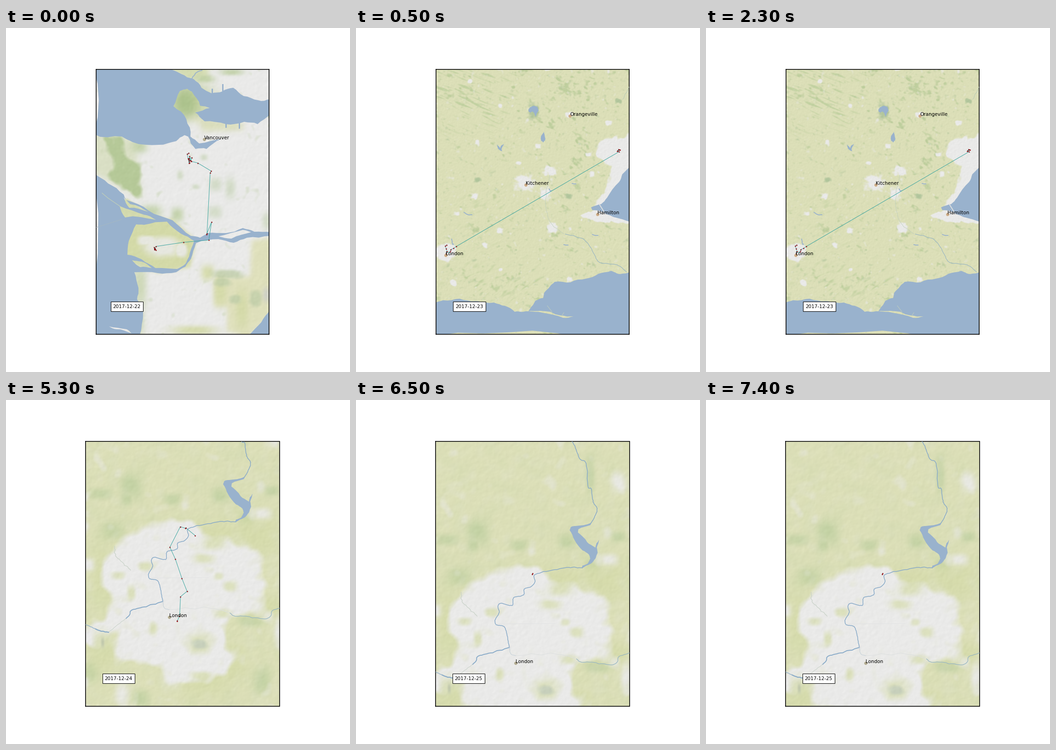
These frames come from a looping animation (748 by 748 pixels, 8 s). A matplotlib script:

```python
import numpy as np
import matplotlib.pyplot as plt
from matplotlib.animation import FuncAnimation
from matplotlib.patches import Polygon, Rectangle
from matplotlib.path import Path

SIZE, DPI = 748, 68
PX = 72 / DPI                     # points per pixel
TOP, BOTTOM = 89.76, 665.72
WATER, TOWN, FIELD = (153, 178, 205), (234, 234, 233), (220, 223, 184)
WOOD, MEADOW, STREAM = (180, 200, 150), (212, 218, 168), (136, 170, 200)
PALE, TEAL, TAN = (200, 210, 200), (60, 165, 160), (206, 172, 135)
GREY = (180, 172, 146)

plt.rcParams["font.family"] = "DejaVu Sans"
fig = plt.figure(figsize=(SIZE / DPI, SIZE / DPI), dpi=DPI, facecolor="white")


def rgb(c):
    return tuple(v / 255 for v in c)


def rough(pts, amp=0.1, levels=2, closed=True):
    """Break straight edges by random midpoint displacement."""
    rng = np.random.default_rng(1)
    p = np.array(pts, float)
    for _ in range(levels):
        d = np.roll(p, -1, 0) - p
        mid = p + d / 2 + d[:, ::-1] * (1, -1) * rng.uniform(-amp, amp, (len(p), 1))
        p = np.stack([p, mid], 1).reshape(-1, 2)
        if not closed:
            p = p[:-1]
    return p


def smooth(pts, n=4):
    """Catmull-Rom curve through the points."""
    p = np.array(pts, float)
    p = np.vstack([2 * p[0] - p[1], p, 2 * p[-1] - p[-2]])
    t = np.linspace(0, 1, n, endpoint=False)[:, None]
    out = []
    for a, b, c, d in zip(p, p[1:], p[2:], p[3:]):
        out.append(0.5 * (2 * b + (c - a) * t + (2 * a - 5 * b + 4 * c - d) * t**2
                          + (3 * b - a - 3 * c + d) * t**3))
    return np.vstack(out + [p[-2:-1]])


def cluster(x, y, n, sx, sy, seed):
    rng = np.random.default_rng(seed)
    return [tuple(p) for p in rng.normal((x, y), (sx, sy), (n, 2))]


class Terrain:
    def __init__(self, x0, y0, x1, y1, base, seed):
        self.extent = (x0, x1, y1, y0)
        self.x, self.y = np.meshgrid(np.arange(x0, x1) + 0.5, np.arange(y0, y1) + 0.5)
        self.img = np.ones(self.x.shape + (3,)) * base
        self.rng = np.random.default_rng(seed)

    def blur(self, a, sx, sy=None, angle=0):
        sy = sy or sx
        pad = 24
        a = np.pad(a, pad, mode="edge")
        fy = np.fft.fftfreq(a.shape[0])[:, None]
        fx = np.fft.rfftfreq(a.shape[1])[None]
        c, s = np.cos(np.radians(angle)), np.sin(np.radians(angle))
        u, v = fx * c + fy * s, fy * c - fx * s
        k = np.exp(-2 * np.pi**2 * ((sx * u)**2 + (sy * v)**2))
        return np.fft.irfft2(np.fft.rfft2(a) * k, a.shape)[pad:-pad, pad:-pad]

    def noise(self, sx, sy=None, angle=0):
        n = self.blur(self.rng.normal(size=self.x.shape), sx, sy, angle)
        return n / n.std()

    def tint(self, mask, color, alpha=1):
        m = np.clip(mask, 0, 1)[..., None] * alpha
        self.img += m * (np.array(color) - self.img)

    def ragged(self, m, rag, grain, width):
        if rag:
            m = (m - 0.5 + rag * self.noise(grain)) / width + 0.5
        return m

    def area(self, pts, color, soft=4, alpha=1, rag=0, grain=4, width=0.6):
        xy = np.c_[self.x.ravel(), self.y.ravel()]
        m = Path(pts).contains_points(xy).reshape(self.x.shape).astype(float)
        self.tint(self.ragged(self.blur(m, soft), rag, grain, width), color, alpha)

    def spots(self, items, color, alpha=1, rag=0, grain=4, width=0.6):
        m = np.zeros(self.x.shape)
        for cx, cy, rx, ry in items:
            d = np.abs((self.x - cx) / rx)**2.6 + np.abs((self.y - cy) / ry)**2.6
            m = np.maximum(m, np.exp(-0.7 * d))
        self.tint(self.ragged(m, rag, grain, width), color, alpha)

    def density(self, items):
        return sum(a * np.exp(-((self.x - cx) / rx)**2 - ((self.y - cy) / ry)**2)
                   for cx, cy, rx, ry, a in items)

    def relief(self, grain, amp):
        n = self.noise(grain)
        d = n - np.roll(n, (1, 1), (0, 1))
        self.img += (amp * d / d.std())[..., None]


class Scene:
    def __init__(self, x0, x1, date, date_x, terrain, shift=(0, 0)):
        dx, dy = shift
        self.ax = fig.add_axes([x0 / SIZE, 1 - BOTTOM / SIZE,
                                (x1 - x0) / SIZE, (BOTTOM - TOP) / SIZE])
        self.ax.set(xticks=[], yticks=[])
        for s in self.ax.spines.values():
            s.set_linewidth(1.6 * PX)
        self.limits = (x0 - dx, x1 - dx), (BOTTOM - dy, TOP - dy)
        bx, by = date_x - dx, 595.3 - dy
        self.ax.add_patch(Rectangle((bx, by), 70.5, 20.5, fc="white", ec="black",
                                    lw=1.05 * PX, zorder=8))
        self.ax.text(bx + 5, by + 13.3, date, fontsize=11, zorder=9)
        self.terrain = terrain
        self.image(0)

    def image(self, z):
        im = self.ax.imshow(np.clip(self.terrain.img / 255, 0, 1), zorder=z,
                            extent=self.terrain.extent, aspect="auto",
                            interpolation="bilinear")
        self.ax.set(xlim=self.limits[0], ylim=self.limits[1])
        return im

    def water(self, pts, amp=0.1, levels=2):
        self.ax.add_patch(Polygon(rough(pts, amp, levels), fc=rgb(WATER), ec="none", zorder=1))

    def island(self, pts, amp=0.07):
        self.image(2).set_clip_path(Path(rough(pts, amp)), self.ax.transData)

    def line(self, pts, color=STREAM, width=1.2, z=3):
        p = np.array(pts)
        self.ax.plot(p[:, 0], p[:, 1], color=rgb(color), lw=width * PX, zorder=z)

    def stream(self, pts, color=STREAM, width=1.2, amp=0.12):
        self.line(rough(smooth(pts), amp, 1, closed=False), color, width)

    def city(self, x, y, name, color):
        self.ax.plot(x, y, "o", ms=7 * PX, mfc=rgb(color), mec="none", zorder=4)
        self.ax.text(x, y, name, fontsize=11, zorder=7)

    def track(self, pts):
        self.line(pts, TEAL, 1, z=5)
        p = np.array(pts)
        self.ax.plot(p[:, 0], p[:, 1], "o", ms=2.1 * PX, mfc=rgb((230, 0, 15)),
                     mec=rgb((70, 15, 15)), mew=0.45 * PX, zorder=6)


def coast_scene():
    t = Terrain(195, 89, 573, 667, TOWN, 3)
    t.area([(195, 228), (280, 240), (295, 372), (195, 318)], (214, 221, 188), 7, 0.8)
    t.area([(208, 234), (255, 235), (260, 284), (292, 292), (292, 374), (212, 318),
            (240, 305)], WOOD, 5, 0.95, 0.12)
    t.spots([(398, 160, 46, 36)], (196, 209, 159))
    t.spots([(390, 163, 20, 28)], (170, 193, 139), 0.9)
    t.area([(340, 80), (440, 80), (440, 110), (395, 115)], (212, 220, 178), 6)
    t.spots([(290, 257, 15, 13), (315, 400, 20, 14), (372, 406, 12, 14),
             (432, 110, 18, 7), (490, 96, 22, 6)], (190, 207, 162), 0.8)
    t.area([(395, 192), (515, 205), (515, 222), (425, 224)], (217, 221, 184), 6, 0.9)
    t.spots([(410, 218, 14, 14)], TOWN, 0.7)
    t.spots([(455, 340, 12, 13), (487, 348, 10, 20), (454, 400, 13, 12), (378, 320, 6, 9),
             (412, 345, 7, 5), (430, 281, 7, 6), (567, 420, 10, 16)], (204, 215, 190), 0.75)
    t.area([(255, 415), (362, 415), (412, 462), (400, 520), (330, 532), (255, 505)], MEADOW)
    t.area([(240, 380), (262, 370), (335, 420), (250, 418)], (211, 218, 174), 2)
    t.spots([(338, 475, 36, 20), (306, 462, 20, 10), (380, 482, 12, 14)], TOWN, 0.85, 0.06, 7)
    t.spots([(290, 560, 14, 46), (285, 640, 14, 30)], (204, 215, 180), 0.9)
    t.area([(533, 462), (580, 455), (573, 625), (528, 670), (480, 660), (480, 605),
            (452, 605), (452, 540), (530, 540)], (223, 224, 188), 5)
    t.spots([(438, 532, 13, 15), (408, 657, 42, 9), (465, 570, 12, 30),
             (512, 610, 12, 36)], MEADOW, 0.9)
    t.spots([(482, 535, 32, 9), (470, 552, 16, 9), (542, 588, 13, 17),
             (498, 590, 13, 9)], (191, 205, 168), 0.75, 0.05)
    t.spots([(566, 580, 8, 14)], (207, 209, 200), 0.9)
    t.relief(2.2, 1.1)
    t.relief(6, 0.8)
    s = Scene(195.5, 572.3, "2017-12-22", 227.5, t)

    s.water([(190, 85), (338, 88), (381, 100), (408, 111), (425, 130), (447, 142), (470, 138),
             (494, 130), (517, 148), (548, 157), (575, 155), (575, 188), (547, 209), (518, 204),
             (478, 209), (432, 203), (424, 196), (411, 184), (443, 174), (422, 169),
             (404, 138), (394, 132), (378, 137), (364, 170), (392, 198), (401, 236),
             (420, 251), (467, 242), (436, 263), (412, 263), (396, 236), (388, 233),
             (370, 246), (332, 254), (275, 248), (252, 236), (190, 230)], 0.09)
    for x, a, b in [(448, 133, 146), (471, 123, 142), (507, 200, 217), (478, 204, 215)]:
        s.line([(x, a), (x, b)], WATER, 3)
    s.water([(190, 314), (222, 338), (256, 362), (261, 374), (310, 397), (362, 418),
             (402, 452), (422, 456), (438, 446), (478, 446), (515, 435), (540, 443),
             (575, 444), (575, 452), (524, 456), (495, 467), (462, 459), (413, 468),
             (402, 502), (390, 519), (370, 531), (330, 533), (279, 531), (288, 565),
             (285, 590), (298, 618), (290, 670), (190, 670)], 0.06)
    s.water([(526, 670), (555, 640), (575, 613), (575, 670)], 0.04)
    s.island([(283, 427), (300, 428), (350, 421), (380, 447), (409, 463), (398, 497),
              (390, 513), (372, 524), (325, 522), (295, 503), (264, 493), (267, 463)], 0.05)
    s.island([(247, 387), (300, 406), (326, 417), (259, 412)])
    s.island([(256, 368), (270, 383), (310, 400), (268, 391)])
    s.island([(274, 505), (295, 508), (317, 522), (292, 520)])
    s.island([(462, 453), (515, 439), (533, 444), (490, 458)], 0.04)
    s.island([(224, 649), (262, 655), (273, 664), (240, 655)])
    s.line([(209, 359), (222, 370), (250, 389)], (190, 205, 185), 1.3)
    s.line([(195, 434), (252, 416)], (165, 184, 195), 1)
    s.stream([(402, 113), (414, 97), (426, 92)], WATER, 1.8)
    s.city(431, 242, "Vancouver", GREY)
    s.track([(397, 272), (394, 274), (396, 284), (404, 282), (402, 289), (399, 279),
             (398, 294)] + cluster(398, 288, 6, 1.6, 3, 5)
            + [(403, 290), (417, 293.5), (446, 311), (444, 315), (437, 447), (436, 449),
               (447, 422), (441, 461), (386, 466), (326, 475)]
            + cluster(323, 481, 9, 1.5, 1.8, 2))
    return s


def region_scene():
    t = Terrain(173, 89, 595, 667, FIELD, 11)
    dens = t.density([(480, 130, 60, 50, 0.9), (490, 260, 28, 100, 1.1),
                      (440, 390, 40, 35, 0.6), (260, 120, 110, 50, 0.6),
                      (400, 180, 45, 60, 0.6), (370, 575, 50, 35, 1),
                      (450, 470, 45, 25, 0.5)])
    t.tint((t.noise(2.6, 1.8, 25) * 0.55 + t.noise(7) * 0.4 + dens - 1.05) * 0.9,
           (181, 201, 149), 0.75)
    left = t.density([(245, 140, 95, 80, 1), (460, 470, 32, 20, 0.8)])
    t.tint((t.noise(9, 1.4, 22) - 0.55) * left, (184, 204, 152), 0.7)
    south = t.density([(300, 560, 110, 40, 0.8), (270, 400, 90, 80, 0.35)])
    t.tint((t.noise(5, 1.8, -35) - 0.7) * south, (188, 206, 155), 0.7)
    t.spots([(265, 330, 7, 5), (385, 182, 10, 14), (460, 366, 8, 6),
             (570, 158, 6, 5)], (160, 187, 145), 0.7, 0.15, 2)
    t.area([(600, 215), (582, 240), (543, 237), (522, 258), (524, 283), (548, 296),
            (556, 312), (545, 345), (516, 388), (535, 392), (600, 310)],
           TOWN, 4, 1, 0.16, 3, 0.35)
    t.area([(484, 408), (520, 394), (596, 416), (596, 425), (525, 422)],
           TOWN, 2, 1, 0.14, 2, 0.4)
    t.area([(174, 475), (196, 466), (220, 478), (214, 498), (195, 510), (174, 498)],
           TOWN, 4, 1, 0.14, 3, 0.4)
    t.spots([(367, 338, 20, 16), (357, 330, 9, 9), (411, 360, 10, 13), (422, 310, 13, 10),
             (426, 433, 11, 11), (396, 257, 6, 5), (353, 294, 5, 4), (263, 248, 5, 5),
             (257, 366, 7, 6), (312, 440, 7, 6), (280, 472, 6, 6), (212, 554, 7, 6),
             (218, 403, 6, 4), (462, 189, 7, 6), (548, 206, 7, 5), (512, 317, 6, 6),
             (505, 275, 6, 4), (463, 545, 6, 5), (313, 169, 4, 4), (247, 115, 4, 4),
             (314, 525, 4, 3)], TOWN, 1, 0.13, 2, 0.4)
    t.relief(1.4, 1.3)
    s = Scene(173.5, 593.8, "2017-12-23", 211, t)

    s.water([(600, 297), (579, 318), (572, 335), (546, 369), (533, 383), (511, 390),
             (514, 396), (530, 398), (560, 411), (600, 422)], 0.06)
    s.water([(168, 598), (190, 592), (260, 594), (300, 597), (345, 617), (375, 616),
             (390, 593), (407, 587), (409, 576), (432, 552), (500, 545), (555, 528),
             (572, 535), (600, 531), (600, 670), (168, 670)], 0.07, 3)
    s.island([(374, 616), (400, 615), (445, 625), (473, 627), (450, 630), (405, 619)])
    s.line([(529, 383), (539, 399)], (225, 227, 225), 1.8)
    s.line([(416, 604), (426, 617)], (190, 203, 190), 1)
    s.line([(447, 626), (452, 619)], (190, 203, 190), 1)
    s.water([(379, 172), (386, 169), (391, 193), (379, 184)], 0.4)
    s.water([(306, 253), (314, 261), (322, 252), (318, 268)], 0.2)
    s.water([(409, 226), (411, 238), (407, 249), (403, 246)], 0.2)
    for x, y, dx, dy in [(235, 401, 17, 5), (208, 459, 4, 11), (470, 338, 8, 1),
                         (420, 350, 5, 4), (514, 449, 12, 2), (452, 471, 9, 1)]:
        s.stream([(x, y), (x + dx / 2, y + dy), (x + dx, y + dy)], WATER, 1.8)
    s.stream([(455, 448), (497, 461), (518, 492), (530, 510), (568, 515), (588, 530)],
             (150, 180, 195), 1.1)
    s.stream([(422, 319), (412, 372), (421, 420), (452, 448)], (192, 207, 188), 0.8)
    s.stream([(594, 128), (580, 155)], (180, 200, 182), 0.9)
    for x, y, name in [(465, 191, "Orangeville"), (369, 341, "Kitchener"),
                       (524.5, 405, "Hamilton"), (194.5, 494, "London")]:
        s.city(x, y, name, TAN)
    s.track([(197, 472), (194, 474), (196, 480), (198, 486), (196, 490), (205, 486),
             (206, 482), (212, 479), (218, 475), (572, 269), (569, 267), (573, 265),
             (571, 264), (568, 268), (574, 265)])
    return s


def london_terrain():
    t = Terrain(170, -14, 606, 668, FIELD, 23)
    t.spots([(272, 187, 22, 26), (262, 212, 12, 16), (205, 204, 22, 11), (361, 216, 16, 11),
             (232, 284, 24, 18), (466, 206, 18, 14), (578, 197, 14, 10), (182, 590, 14, 20),
             (557, 610, 17, 28), (293, 648, 16, 16), (534, 481, 24, 11), (516, 62, 9, 34),
             (522, 255, 14, 14)], (188, 206, 158), 0.75, 0.07, 8, 1.1)
    t.spots([(450, 300, 70, 36), (545, 290, 50, 40), (217, 380, 30, 65), (490, 575, 30, 40),
             (560, 450, 40, 20), (430, 600, 50, 40), (210, 540, 30, 50)], MEADOW, 0.75)
    t.area([(262, 296), (300, 275), (345, 262), (408, 264), (425, 290), (500, 318),
            (550, 325), (566, 455), (482, 470), (476, 540), (500, 560), (475, 600),
            (345, 618), (338, 582), (232, 558), (236, 500), (205, 545), (176, 530),
            (176, 490), (222, 480), (226, 430), (205, 392), (212, 345)],
           TOWN, 8, 1, 0.17, 8, 0.6)
    t.spots([(577, 78, 15, 20), (557, 247, 17, 11), (180, 358, 10, 12), (594, 500, 10, 30),
             (252, 640, 14, 26), (480, 330, 20, 14), (518, 345, 18, 26),
             (360, 595, 16, 26)], TOWN, 0.85, 0.06, 7, 1)
    t.spots([(300, 362, 12, 8), (245, 382, 12, 8), (272, 420, 8, 14), (205, 428, 18, 14),
             (462, 383, 9, 7), (487, 405, 13, 10), (430, 345, 20, 9), (452, 312, 22, 14),
             (418, 528, 24, 20), (320, 495, 8, 13), (470, 465, 18, 9), (425, 600, 20, 9),
             (210, 528, 20, 22)], (214, 220, 174), 0.75, 0.09, 6, 0.9)
    t.spots([(420, 531, 16, 10)], (198, 207, 188), 0.9, 0.06)
    t.spots([(210, 527, 3, 9)], (186, 194, 168), 0.8)
    t.spots([(388, 410, 55, 42)], TOWN, 0.9)
    t.relief(3, 1.2)
    t.relief(1.6, 0.7)
    return t


def london_scene(terrain, date, shift, track):
    s = Scene(172.7, 594.5, date, 209.7, terrain, shift)
    s.water([(472, 183), (475, 176), (485, 174), (519, 167), (517, 172), (491, 181),
             (490, 188), (510, 209), (528, 221), (530, 212), (536, 204), (531, 221),
             (533, 232), (528, 245), (518, 256), (498, 266), (500, 260), (512, 255),
             (517, 245), (514, 236), (500, 227), (483, 205)], 0.07)
    s.stream([(476, -12), (484, 2), (494, 28), (508, 38), (512, 88), (519, 93),
              (523, 122), (532, 136), (526, 155), (518, 168)], width=1.5)
    s.stream([(500, 265), (470, 264), (430, 271), (396, 280), (397, 295), (388, 306),
              (373, 311), (372, 324), (350, 330), (347, 347), (322, 342), (316, 350),
              (319, 362), (310, 378), (313, 389), (330, 393), (336, 412), (341, 438)],
             width=1.5)
    s.stream([(341, 438), (300, 450), (273, 457), (269, 467), (261, 475)], width=1.9)
    s.stream([(261, 475), (245, 487), (223, 505)], PALE, 1)
    s.stream([(223, 505), (205, 502), (195, 498)], width=2.2)
    s.stream([(195, 498), (182, 492), (170, 487)])
    s.stream([(341, 438), (344, 452), (355, 456)], (195, 207, 215), 1)
    s.stream([(487, 463), (497, 470), (520, 470), (562, 476), (576, 469), (579, 458),
              (604, 450)], (148, 180, 195))
    s.stream([(236, 318), (238, 338), (252, 352), (271, 370)], PALE, 1.2, 0.3)
    s.stream([(355, 456), (440, 452), (485, 462)], (221, 224, 224), 1)
    s.line([(312, 387), (440, 386)], (226, 227, 228), 1)
    s.city(355, 472, "London", GREY)
    s.track(track)
    return s


walk = [(411, 294.5), (391, 278), (390.5, 279), (379, 275.5), (356.3, 320), (368.3, 346),
        (382.5, 388), (393.7, 416), (379.5, 427.5), (377.5, 470), (372.5, 480), (372.5, 481)]
stay = [(390.4, 278.6), (391.4, 277.4)]

ground = london_terrain()
scenes = [
    coast_scene(),
    region_scene(),
    london_scene(ground, "2017-12-24", (0, 0), walk),
    london_scene(ground, "2017-12-25", (-7.5, 100), stay),
]
STEP = 500
STARTS = [500, 3500, 6500]


def update(i):
    now = np.searchsorted(STARTS, i * STEP, side="right")
    for k, s in enumerate(scenes):
        s.ax.set_visible(k == now)
    return []


anim = FuncAnimation(fig, update, frames=16, interval=STEP, repeat=True,
                     init_func=lambda: update(0), blit=False)
plt.show()
```
